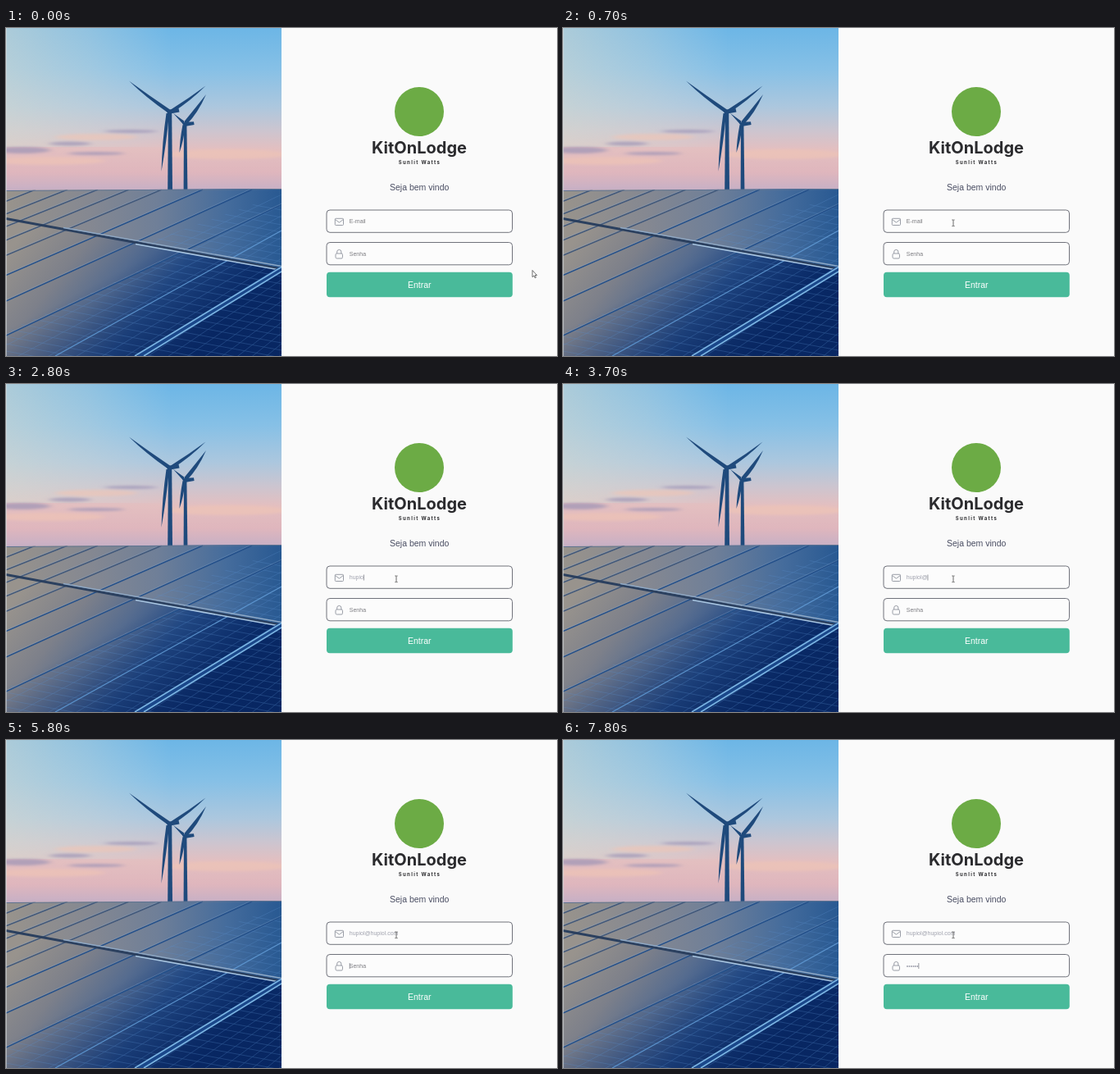
Recreate the animation shown at these times as an HTML page. Size 672 by 400 pixels, loop 8000 ms.

```html
<!DOCTYPE html>
<html lang="pt-BR">
<head>
<meta charset="utf-8">
<title>Login</title>
<style>
  html, body { margin: 0; width: 100%; height: 100%; overflow: hidden; background: #fafafa; }
  svg { display: block; width: 672px; height: 400px; }
  text { font-family: "Liberation Sans", Arial, sans-serif; }
  .brand { font-family: Inter, sans-serif; font-weight: 700; fill: #2b2b2e; text-anchor: middle; }
  .mid { font-size: 10.5px; text-anchor: middle; }
  .field { fill: #fcfcfc; stroke: #70727b; }
  .icon { fill: none; stroke: #8e929c; stroke-width: .9; }
  .input { font-size: 7px; fill: #7c7c80; }
  .typed { fill: #a0a2ae; }
  .dark { fill: #1f4a7c; }
</style>
</head>
<body>
<svg viewBox="0 0 672 400">
  <defs>
    <linearGradient id="sky" x1="0" y1="0" x2="0" y2="1">
      <stop offset="0" stop-color="#6cb6e6"/>
      <stop offset=".25" stop-color="#86c0e6"/>
      <stop offset=".48" stop-color="#acc7de"/>
      <stop offset=".62" stop-color="#cbc5d0"/>
      <stop offset=".74" stop-color="#e3bfc0"/>
      <stop offset=".88" stop-color="#dfb6bd"/>
      <stop offset="1" stop-color="#c4afc6"/>
    </linearGradient>
    <linearGradient id="haze">
      <stop offset="0" stop-color="#d6d9d0" stop-opacity=".6"/>
      <stop offset=".3" stop-color="#d3d9d6" stop-opacity=".35"/>
      <stop offset=".6" stop-color="#d3dce0" stop-opacity="0"/>
    </linearGradient>
    <linearGradient id="upper">
      <stop offset="0" stop-color="#98938c"/>
      <stop offset=".3" stop-color="#858891"/>
      <stop offset=".55" stop-color="#6f7f98"/>
      <stop offset=".8" stop-color="#456c9c"/>
      <stop offset="1" stop-color="#285992"/>
    </linearGradient>
    <linearGradient id="lower" gradientUnits="userSpaceOnUse" x1="20" y1="230" x2="230" y2="400">
      <stop offset=".05" stop-color="#98938d"/>
      <stop offset=".3" stop-color="#7d808a"/>
      <stop offset=".5" stop-color="#566c8f"/>
      <stop offset=".7" stop-color="#274f8a"/>
      <stop offset="1" stop-color="#0c3273"/>
    </linearGradient>
    <linearGradient id="shade" x1="0" y1=".3" x2=".6" y2="1">
      <stop offset=".45" stop-color="#051f57" stop-opacity="0"/>
      <stop offset="1" stop-color="#051f57" stop-opacity=".6"/>
    </linearGradient>
    <filter id="soft" x="-30%" y="-100%" width="160%" height="300%"><feGaussianBlur stdDeviation="4 1.4"/></filter>
    <clipPath id="photo"><rect width="336" height="400"/></clipPath>
    <clipPath id="ground"><path d="M0 198L336 196V400H0Z"/></clipPath>
    <clipPath id="cells"><path d="M336 203L165 264L336 294ZM215 272L336 294V400H0V370Z"/></clipPath>
  </defs>

  <g clip-path="url(#photo)">
    <rect width="336" height="200" fill="url(#sky)"/>
    <rect width="336" height="145" fill="url(#haze)"/>
    <g filter="url(#soft)">
      <g fill="#9c93b6" opacity=".7">
        <ellipse cx="20" cy="149" rx="34" ry="4"/>
        <ellipse cx="78" cy="141" rx="25" ry="2.5"/>
        <ellipse cx="152" cy="126" rx="32" ry="2"/>
        <ellipse cx="110" cy="153" rx="34" ry="2"/>
      </g>
      <g fill="#f0c5b5" opacity=".6">
        <ellipse cx="110" cy="133" rx="50" ry="4"/>
        <ellipse cx="50" cy="162" rx="70" ry="5"/>
        <ellipse cx="270" cy="154" rx="75" ry="6"/>
      </g>
    </g>

    <g class="dark">
      <path d="M217 119h3.400l1 79h-4.800z"/>
      <path d="M217 114.500Q233 95 244 81Q234 104 220 118ZM218 114L204 104L216.500 118ZM215.500 118Q212 136 211.500 152Q217 136 218.500 120Z"/>
      <path d="M215 115l14-.8.6 3.800-13 2.200z"/>
      <path d="M198 103h4.200l.8 95h-5.800z"/>
      <path d="M200 99.500Q174 82 150 64.500Q171 85 197 103ZM201 99.500Q224 85 243.500 70.500Q225 89 203 103ZM195.500 104Q190.500 138 189.500 175Q196 138 199 104Z"/>
      <path d="M195 100l15.500-2 1 4.500-14 2.500z"/>
    </g>

    <g clip-path="url(#ground)">
      <rect y="195" width="336" height="205" fill="url(#lower)"/>
      <rect y="195" width="336" height="205" fill="url(#shade)"/>
      <path d="M0 195H336V293L0 231Z" fill="url(#upper)"/>
      <g id="fine" clip-path="url(#cells)" stroke="#5c91cf" stroke-width=".7" opacity=".4"></g>
      <g id="seams"></g>
      <path d="M0 232.500L155 261L336 294" fill="none" stroke="#2b405f" stroke-width="3"/>
      <path d="M70 243.500L336 290.500" stroke="#8fa9c6" stroke-width="1.300"/>
      <path d="M158 263.500L336 295.500" stroke="#a9c6e2" stroke-width="1.500"/>
      <path d="M162 401L336 293" stroke="#1a478a" stroke-width="6"/>
      <path d="M157 400L336 291.500M168 400L336 297" stroke="#79b3e2" stroke-width="1.700"/>
      <path d="M0 198.500L336 196.500" stroke="#5d7391" stroke-width="1.200"/>
    </g>
    <rect width=".8" height="400" fill="#dfe3e4" opacity=".7"/>
  </g>

  <rect x="336" width="336" height="400" fill="#fafafa"/>
  <circle cx="504" cy="102" r="30" fill="#6cab45"/>
  <text class="brand" x="504" y="152.500" font-size="20">KitOnLodge</text>
  <text class="brand" x="504.500" y="166" font-size="6" letter-spacing="1.350">Sunlit Watts</text>
  <text class="mid" x="504.200" y="197.500" fill="#4a4e63">Seja bem vindo</text>

  <rect class="field" x="391" y="222" width="226.500" height="27.300" rx="4"/>
  <rect class="field" x="391" y="261.500" width="226.500" height="27.300" rx="4"/>
  <g class="icon">
    <rect x="401.300" y="232.300" width="10.200" height="8.200" rx="1"/>
    <path d="M401.500 233.500L406.400 237.200L411.300 233.500"/>
    <rect x="402" y="275" width="8.500" height="6" rx="1.500"/>
    <path d="M403.700 275V273a2.600 2.600 0 0 1 5.200 0V275"/>
  </g>
  <text id="email" class="input" x="418.800" y="238.400">E-mail</text>
  <text id="pass" class="input" x="418.800" y="277.900">Senha</text>
  <rect id="caret" width=".7" height="7" fill="#6c6f79"/>

  <rect x="391" y="297.800" width="226.800" height="30.500" rx="4" fill="#49ba9a"/>
  <text class="mid" x="504.300" y="316.800" fill="#fff">Entrar</text>

  <g id="mouse">
    <path id="arrow" d="M0 0V8.200L1.900 6.500L3.200 9.300L4.400 8.700L3.200 6H5.500Z" fill="#fff" stroke="#333" stroke-width=".7"/>
    <path id="beam" d="M-1.600 -3.800H-.4L0 -3.400L.4 -3.800H1.600M0 -3.400V3.400M-1.600 3.800H-.4L0 3.400L.4 3.800H1.600" fill="none" stroke="#444" stroke-width=".8"/>
  </g>
</svg>
<script>
  const LOOP = 8000, CLICK = 1000, TAB = 5800;
  const $ = id => document.getElementById(id);
  const NS = "http://www.w3.org/2000/svg";

  function line(parent, x1, y1, x2, y2, attrs = {}) {
    const el = document.createElementNS(NS, "line");
    Object.entries({ x1, y1, x2, y2, ...attrs }).forEach(([k, v]) => el.setAttribute(k, v));
    $(parent).append(el);
  }

  // Panel seams fan out towards the lower left.
  const tops = [36, 75, 112, 150, 190, 240, 300, 375];
  tops.forEach((x, i) => {
    const y = 198 + .36 * x + .0003 * x * x;
    line("seams", x, 197, 0, y, { stroke: i < 5 ? "#41587a" : "#24508a", "stroke-width": 1.5 });
    line("seams", x, 195.6, 0, y - 1.5, { stroke: "#8fadd0", "stroke-width": .6, opacity: .5 });
  });
  line("seams", 336, 247, 60, 400, { stroke: "#5b93cd", "stroke-width": 1.2 });

  // Fine cell grid.
  for (let i = 0; i < 34; i++) {
    line("fine", 0, 160 + i * 9, 336, 222 + i * 9);
    if (i < 22) line("fine", 336, 190 + i * 13, 0, 345 + i * 21);
  }

  const fields = {
    email: { el: $("email"), hint: "E-mail", value: "hupiol@hupiol.com", y: 232.5,
      keys: [1600, 1800, 2500, 2700, 2800, 3000, 3700, 4100, 4300, 4400, 4500, 4600, 4800, 5300, 5400, 5500, 5700] },
    pass: { el: $("pass"), hint: "Senha", value: "••••••", y: 272,
      keys: [6700, 7000, 7200, 7400, 7600, 7800] }
  };

  function type(field, t) {
    const n = field.keys.filter(k => k <= t).length;
    const text = n ? field.value.slice(0, n) : field.hint;
    if (field.el.textContent !== text) field.el.textContent = text;
    field.el.classList.toggle("typed", n > 0);
    return n;
  }

  function drawCaret(t, counts) {
    const name = t < TAB ? "email" : "pass";
    const f = fields[name], n = counts[name];
    const since = n ? f.keys[n - 1] : name === "email" ? CLICK : TAB + 100;
    const on = t >= CLICK && (t - since) % 1000 < 500;
    $("caret").setAttribute("visibility", on ? "visible" : "hidden");
    $("caret").setAttribute("x", 418.8 + (n ? f.el.getComputedTextLength() : 0));
    $("caret").setAttribute("y", f.y);
  }

  function drawMouse(t) {
    const p = Math.min(1, Math.floor(t / 100) / 6);
    const e = p * p * (3 - 2 * p);
    const x = 642 - 166 * e, y = 295.5 - 57.7 * e;
    const over = x < 617 && (y < 249 || (y > 261 && y < 289));
    $("mouse").setAttribute("transform", `translate(${x} ${y})`);
    $("arrow").setAttribute("visibility", over ? "hidden" : "visible");
    $("beam").setAttribute("visibility", over ? "visible" : "hidden");
  }

  function draw(now) {
    const t = now % LOOP;
    const counts = { email: type(fields.email, t), pass: type(fields.pass, t) };
    drawCaret(t, counts);
    drawMouse(t);
    requestAnimationFrame(draw);
  }
  draw(performance.now());
</script>
</body>
</html>
```
